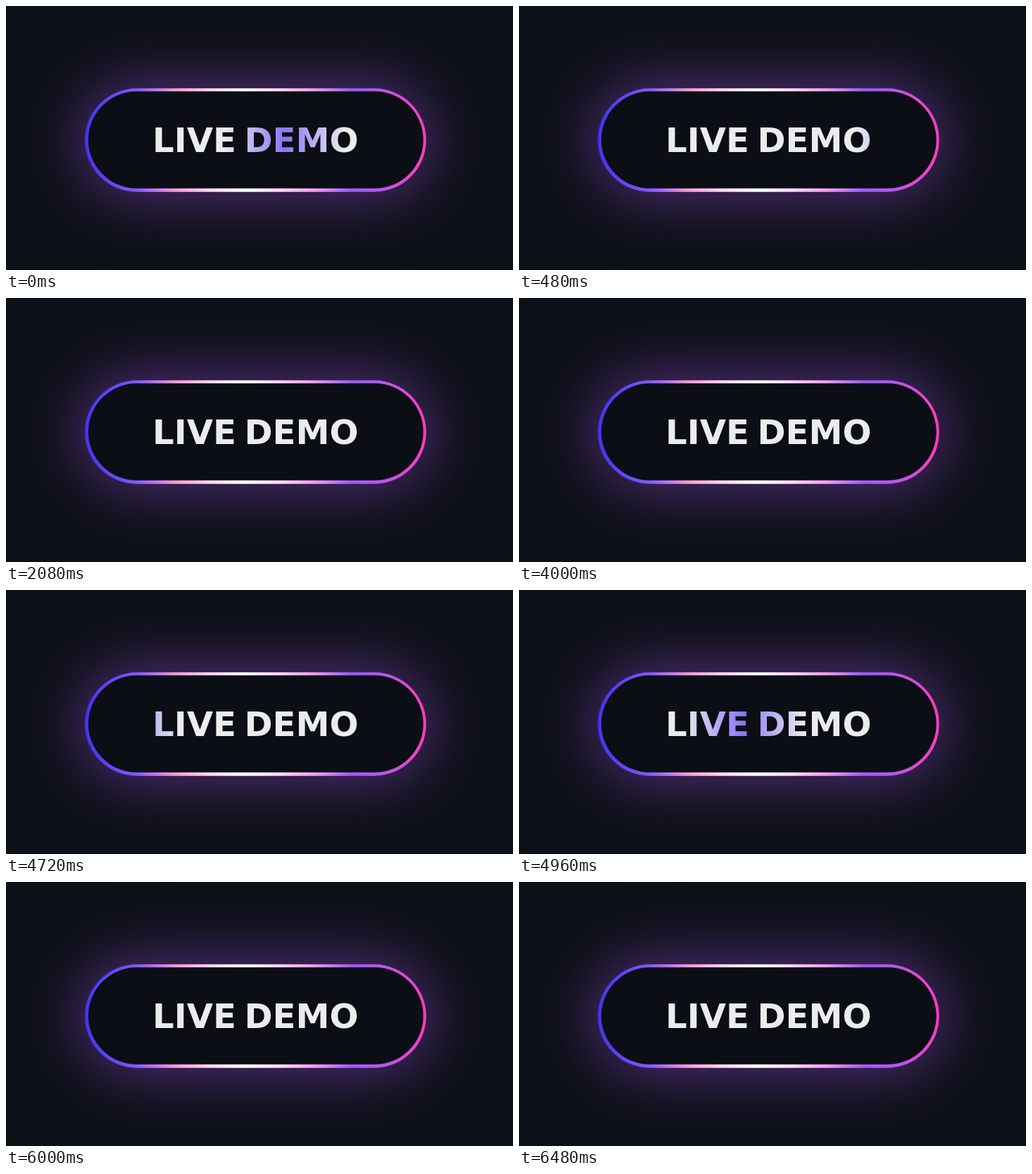
Animation, 720 px wide and 376 px high, one loop 8 s. Source, as an HTML page:

```html
<!DOCTYPE html>
<html lang="en">
<head>
<meta charset="utf-8">
<title>Live demo button</title>
<style>
  html, body { margin: 0; height: 100%; overflow: hidden; background: #0c1017; }
  svg { display: block; width: 720px; height: 376px; }
  text { font: 700 48.2px "DejaVu Sans", sans-serif; word-spacing: -5px; }
</style>
</head>
<body>
<svg viewBox="0 0 720 376">
  <defs>
    <linearGradient id="rim" gradientUnits="userSpaceOnUse" x1="112" x2="597">
      <stop offset="0" stop-color="#4632f0"/>
      <stop offset=".15" stop-color="#8059ff"/>
      <stop offset=".2" stop-color="#b573f4"/>
      <stop offset=".27" stop-color="#ff9fd9"/>
      <stop offset=".36" stop-color="#ffd5ef"/>
      <stop offset=".47" stop-color="#ffffff"/>
      <stop offset=".57" stop-color="#ffd8f7"/>
      <stop offset=".67" stop-color="#f3a0f0"/>
      <stop offset=".78" stop-color="#9b5cff"/>
      <stop offset=".88" stop-color="#bd55ec"/>
      <stop offset="1" stop-color="#ff3cb8"/>
    </linearGradient>
    <linearGradient id="shine" gradientUnits="userSpaceOnUse" x1="-86" x2="86">
      <stop offset="0" stop-color="#ececec"/>
      <stop offset=".5" stop-color="#8b74f5"/>
      <stop offset="1" stop-color="#ececec"/>
    </linearGradient>
    <filter id="blur" filterUnits="userSpaceOnUse" x="-60" y="-60" width="840" height="496"
            color-interpolation-filters="sRGB">
      <feGaussianBlur stdDeviation="43"/>
    </filter>
  </defs>
  <rect width="720" height="376" fill="#0c1017"/>
  <rect x="104" y="109" width="501" height="164" rx="82" fill="#7a3fae" opacity=".64" filter="url(#blur)"/>
  <rect x="112" y="117.3" width="484.7" height="147.4" rx="73.7" fill="url(#rim)"/>
  <rect x="116.8" y="121.5" width="475.9" height="138.3" rx="69.2" fill="#0b0e15"/>
  <text x="208" y="208" fill="url(#shine)">LIVE DEMO</text>
</svg>
<script>
  const LOOP = 8000, STEP = 80, SWEEP_END = 5920, SWEEP_GAP = 5100;
  const shine = document.getElementById('shine');

  // The highlight decelerates to rest just past the last letter.
  function shineCentre(t) {
    const sweepTime = t < 4000 ? t + SWEEP_GAP : t;
    const left = Math.max(0, SWEEP_END - sweepTime);
    return 600 - 3.04e-4 * left * left;
  }

  function draw() {
    const t = Math.floor(performance.now() % LOOP / STEP) * STEP;
    shine.setAttribute('gradientTransform', `translate(${shineCentre(t)} 0)`);
    requestAnimationFrame(draw);
  }
  draw();
</script>
</body>
</html>
```
